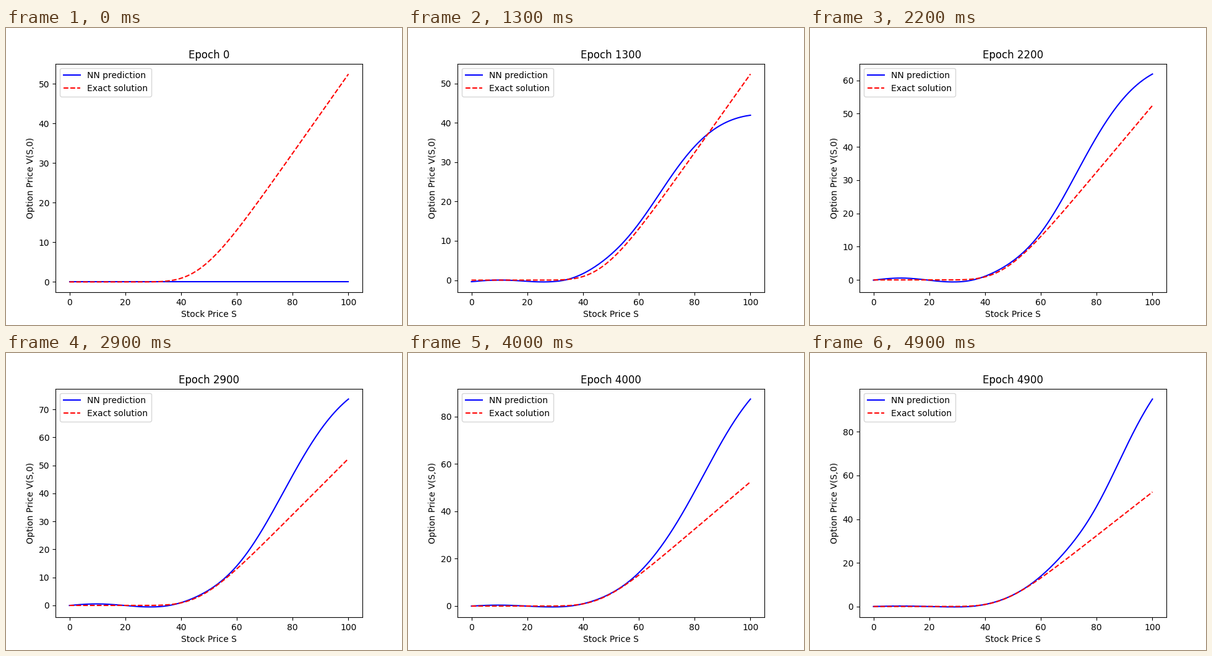
Write a matplotlib script that moves like this. It is 640 px wide and 480 px high and loops after 5 s.

```python
import math

import numpy as np
import matplotlib.pyplot as plt
from matplotlib.animation import FuncAnimation

FRAMES, INTERVAL, EPOCH_STEP = 50, 100, 100
STRIKE, RATE, SIGMA, MATURITY = 50, 0.05, 0.2, 1.0


def normal_cdf(x):
    return 0.5 * (1 + math.erf(x / math.sqrt(2)))


def call_price(s):
    """Black-Scholes value of a European call."""
    if s <= 0:
        return 0.0
    spread = SIGMA * math.sqrt(MATURITY)
    d1 = (math.log(s / STRIKE) + (RATE + SIGMA**2 / 2) * MATURITY) / spread
    discounted = STRIKE * math.exp(-RATE * MATURITY)
    return s * normal_cdf(d1) - discounted * normal_cdf(d1 - spread)


def bell(s, center, width):
    return np.exp(-((s - center) / width)**2)


def network_output(s, t):
    """Prediction at training progress t in 0..1; high prices learn slowest."""
    ceiling = 118 * (np.maximum(s - 30, 0) / 70)**2.5
    lag = 1 - s / 100
    speed = 1.69 * np.exp(4.2 * lag + 2 * lag**2)
    learned = ceiling * (1 - np.exp(-speed * t))

    # Blurred kink early in training
    phase = t / 0.16
    early = (phase * math.exp(1 - phase))**3
    blur = early * (1.9 * bell(s, 50, 16) - 0.6 * bell(s, 0, 40))

    # Ripple on the flat part, slowly damped
    swing = 0.75 * (1 - math.exp(-(t / 0.28)**3)) * (1 - 0.75 * t**2)
    ripple = swing * np.sin(2 * np.pi * s / 39) * np.exp(-(s / 60)**4)

    # Late sag toward the exact solution
    sag = 5 * t**8 * bell(s, 81, 12.7)
    return learned + blur + ripple - sag


prices = np.linspace(0, 100, 200)
exact = [call_price(s) for s in prices]

fig, ax = plt.subplots(figsize=(6.4, 4.8), dpi=100)
prediction, = ax.plot(prices, np.zeros_like(prices), "b-", label="NN prediction")
ax.plot(prices, exact, "r--", label="Exact solution")
ax.set_xlabel("Stock Price S")
ax.set_ylabel("Option Price V(S,0)")
title = ax.set_title("Epoch 0")
ax.legend(loc="upper left")


def update(frame):
    prediction.set_ydata(network_output(prices, frame / FRAMES))
    title.set_text(f"Epoch {frame * EPOCH_STEP}")
    ax.relim()
    ax.autoscale_view()
    return prediction, title


anim = FuncAnimation(fig, update, frames=FRAMES, interval=INTERVAL,
                     repeat=True, repeat_delay=0)
plt.show()
```
